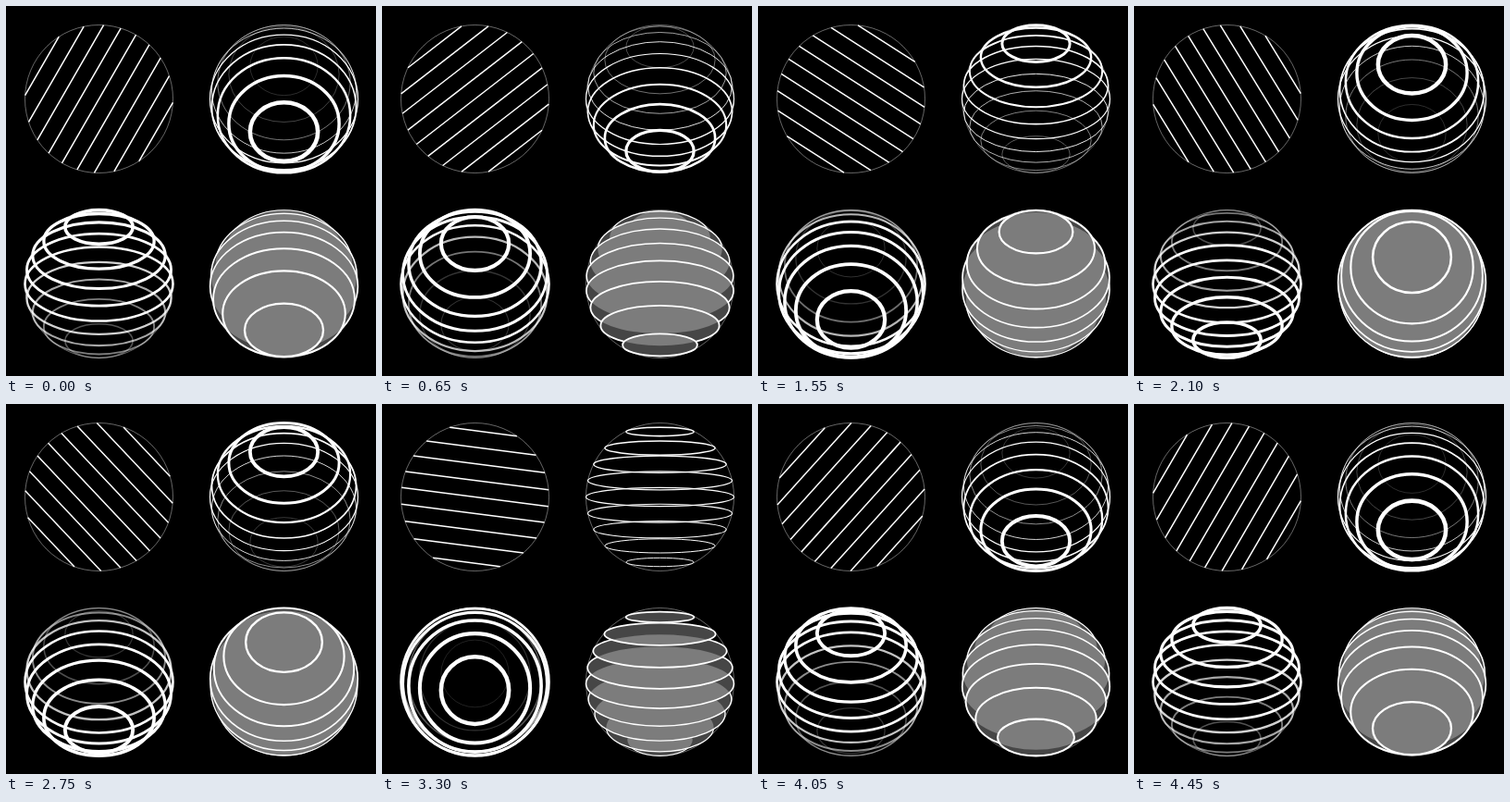
Recreate the animation shown at these times as an HTML page with a canvas. Size 400x400 px, loop 4500 ms.

```html
<!DOCTYPE html>
<html>
<head>
<meta charset="utf-8">
<title>Sliced spheres</title>
<style>
html, body { margin: 0; height: 100%; overflow: hidden; background: #000; }
canvas { display: block; }
</style>
</head>
<body>
<canvas id="stage" width="400" height="400"></canvas>
<script>
const ctx = document.getElementById('stage').getContext('2d');
const R = 80, LOOP = 4500, STEP = 50, RAD = Math.PI / 180;
const BEND = 0.2, LIFT = 12 * RAD;
const heights = Array.from({ length: 9 }, (_, i) => R * (i - 4) * 2 / 9);
const sliceRadius = h => Math.sqrt(R * R - h * h);

// Outline of the circle cut from the sphere at height h along a tilted axis.
function slice(h, tilt) {
  const r = sliceRadius(h), z = h * Math.sin(tilt);
  const path = new Path2D();
  path.ellipse(0, h * Math.cos(tilt), r, r * Math.abs(Math.sin(tilt)), 0, 0, 2 * Math.PI);
  return { path, z, near: (z / R + 1) / 2 };
}

// Slice whose plane is bent by perspective along the depth axis, seen from above.
function bentSlice(h, phi) {
  const gamma = 1 / Math.sqrt(1 - BEND * BEND);
  const y = Math.cos(phi), z = gamma * (Math.sin(phi) - BEND * h / R);
  const offset = gamma * (h - BEND * R * Math.sin(phi));
  return slice(offset / Math.hypot(y, z), Math.atan2(z, y) - LIFT);
}

// Slices from the farthest to the nearest.
const slices = (angle, cut = slice) =>
  heights.map(h => cut(h, angle)).sort((a, b) => a.z - b.z);

function stroke(path, width, alpha = 1) {
  ctx.lineWidth = width;
  ctx.strokeStyle = `rgba(255,255,255,${alpha})`;
  ctx.stroke(path);
}

function panel(x, y, draw) {
  ctx.save();
  ctx.translate(x + 0.5, y + 0.5);
  const rim = new Path2D();
  rim.arc(0, 0, R, 0, 7);
  stroke(rim, 1, 0.4);
  draw();
  ctx.restore();
}

function sideView(phi) {
  ctx.rotate(-phi);
  const lines = new Path2D();
  for (const h of heights) {
    const r = sliceRadius(h);
    lines.moveTo(-r, h);
    lines.lineTo(r, h);
  }
  stroke(lines, 1.5);
}

function frontView(phi) {
  for (const { path, near } of slices(phi)) stroke(path, 0.15 + 6 * near ** 2.5);
}

function topView(phi) {
  for (const { path, near } of slices(phi + Math.PI / 2)) {
    const alpha = Math.min(1, Math.max(0.2, (near - 0.17) * 3));
    stroke(path, 0.4 + 4.4 * near, alpha);
  }
}

// Overlapping discs are lighter than a single layer.
function solidView(phi) {
  const behind = new Path2D();
  for (const { path, near } of slices(phi, bentSlice)) {
    ctx.save();
    ctx.clip(path);
    ctx.fillStyle = '#464646';
    ctx.fill(path);
    ctx.fillStyle = '#7c7c7c';
    ctx.fill(behind);
    ctx.restore();
    stroke(path, 0.4 + 2.4 * near);
    behind.addPath(path);
  }
}

function frame(now) {
  const t = Math.floor(now % LOOP / STEP) * STEP;
  const phi = 60 * RAD * Math.cos((t / LOOP * 360 - 1) * RAD);
  ctx.fillStyle = '#000';
  ctx.fillRect(0, 0, 400, 400);
  panel(100, 100, () => sideView(phi));
  panel(300, 100, () => frontView(phi));
  panel(100, 300, () => topView(phi));
  panel(300, 300, () => solidView(phi));
}

const start = performance.now();
function tick() {
  frame(performance.now() - start);
  requestAnimationFrame(tick);
}
tick();
</script>
</body>
</html>
```
